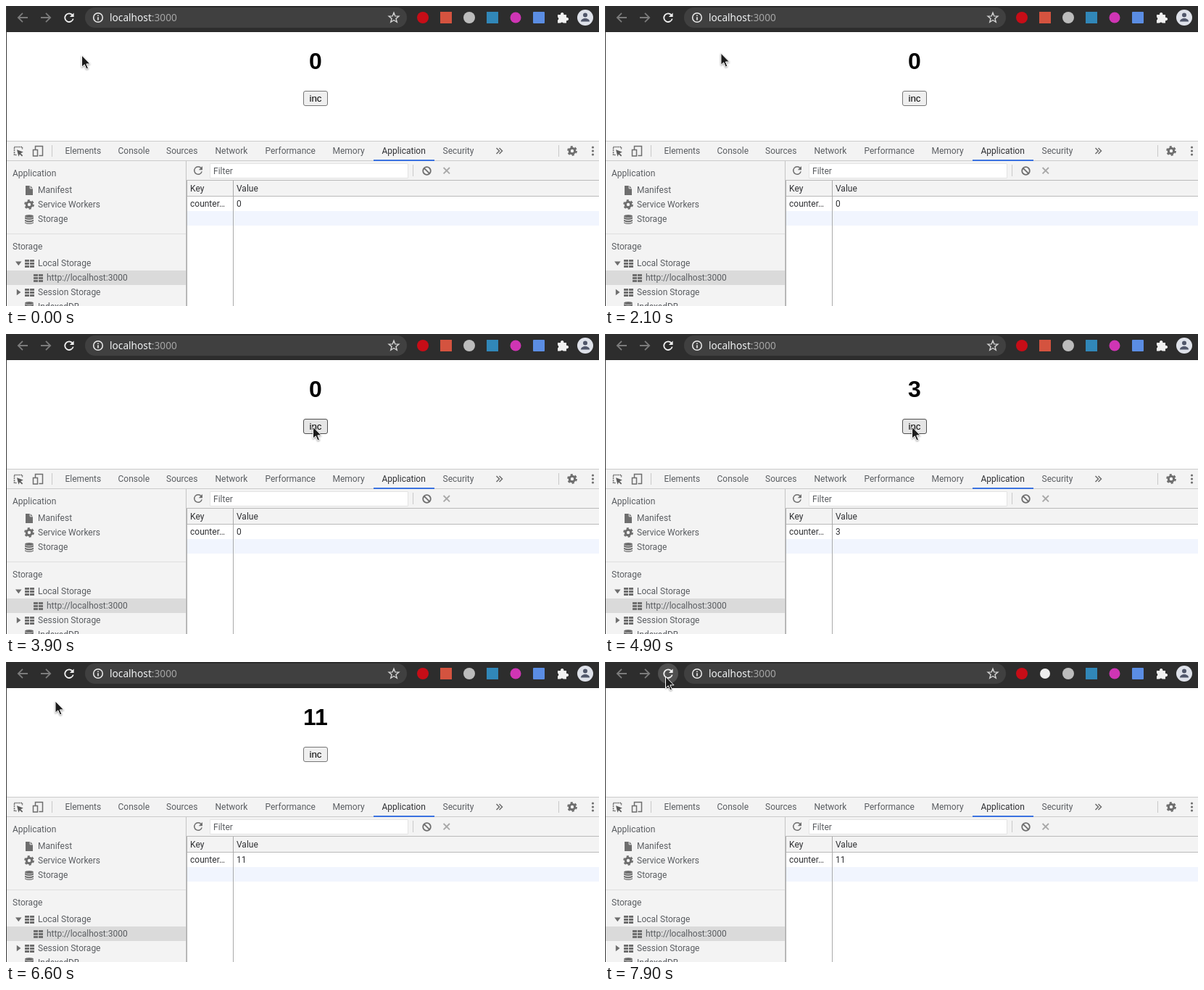
An HTML page that plays this animation: 818x414 px, repeating every 8000 ms.

```html
<!DOCTYPE html>
<html lang="en">
<head>
<meta charset="utf-8">
<title>Counter kept in local storage</title>
<style>
  html, body { margin: 0; width: 100%; height: 100%; overflow: hidden; background: #fff; }
  svg { display: block; width: 818px; height: 414px; }
  text { font: 12px Roboto, sans-serif; fill: #5a5d61; white-space: pre; }
  .dark { fill: #303134; }
  .url { font: 13.7px "Noto Sans", "Open Sans", sans-serif; fill: #f1f3f4; }
  .title { font: bold 32px "Liberation Sans", Arial, sans-serif; fill: #000; text-anchor: middle; }
  .label { font: 13.333px "Liberation Sans", Arial, sans-serif; fill: #000; text-anchor: middle; }
  .line { fill: none; stroke: #6e6e6e; stroke-width: 1.5; }
</style>
</head>
<body>
<svg viewBox="0 0 818 414">
  <defs>
    <path id="reload" d="M4.6-3.6A5.8 5.8 0 1 0 5.7 1.6M5.8-6.6V-1.3H.5Z"/>
    <g id="grid" fill="#6e6e6e">
      <path d="M0 0h6v3H0zM7 0h6v3H7zM0 4h6v3H0zM7 4h6v3H7zM0 8h6v3H0zM7 8h6v3H7z"/>
    </g>
    <g id="disk" fill="#6e6e6e">
      <ellipse cx="6" cy="2" rx="6" ry="2"/>
      <path d="M0 3.3q6 3 12 0v2.2q-6 3-12 0zM0 6.8q6 3 12 0V9q-6 3-12 0zM0 10.2q6 3 12 0v1.2q-6 3-12 0z"/>
    </g>
    <g id="gear">
      <circle r="3.7" fill="none" stroke="#6e6e6e" stroke-width="3"/>
      <circle r="5.8" fill="none" stroke="#6e6e6e" stroke-width="2.2" stroke-dasharray="3.04 3.04"/>
    </g>
  </defs>

  <!-- browser bar -->
  <rect width="818" height="36" fill="#2d2d2d"/>
  <rect y="35" width="818" height="1" fill="#262626"/>
  <circle id="hover" cx="87" cy="16" r="14" fill="#505050"/>
  <g fill="none" stroke="#7b7b7b" stroke-width="1.8">
    <path d="M30 16H17M23 9.8L16.8 16 23 22.2"/>
    <path d="M48 16H61M55 9.8L61.2 16 55 22.2"/>
  </g>
  <g transform="translate(87 16)" fill="none" stroke="#f1f1f1" stroke-width="1.8">
    <path d="M4.5-3.6A5.8 5.8 0 1 0 5.7 1.6"/>
    <path d="M6.6-6.6V-.9H.9Z" fill="#f1f1f1" stroke="none"/>
  </g>
  <rect x="109" y="2" width="444" height="28" rx="14" fill="#404040"/>
  <circle cx="127" cy="16" r="6.3" fill="none" stroke="#eee" stroke-width="1.5"/>
  <path d="M126.2 12.4h1.6v1.6h-1.6zM126.2 15.2h1.6v4.4h-1.6z" fill="#eee"/>
  <text class="url" x="143" y="21">localhost<tspan fill="#a4a4a4">:3000</tspan></text>
  <path id="star" fill="none" stroke="#d5d5d5" stroke-width="1.4"/>
  <circle cx="575" cy="16" r="8" fill="#c70d17"/>
  <rect id="devIcon" x="599" y="8" width="16" height="16" fill="#d4533f"/>
  <circle id="idleIcon" cx="607" cy="16" r="7" fill="#eee"/>
  <circle cx="639" cy="16" r="8" fill="#bcbcbc"/>
  <rect x="663" y="8" width="16" height="16" fill="#3187b8"/>
  <circle cx="703" cy="16" r="7.5" fill="#cf35b4"/>
  <rect x="727" y="8" width="16" height="16" rx="1" fill="#5b8de3"/>
  <path d="M761 12h4.2a2.2 2.2 0 1 1 4 0h3.8v4a2.2 2.2 0 1 1 0 4v3.6h-4.2a2.2 2.2 0 0 0-3.8 0H761v-4a2.2 2.2 0 0 0 0-4z" fill="#f1f1f1"/>
  <circle cx="799" cy="16" r="11" fill="#dfe2ea"/>
  <circle cx="799" cy="12.6" r="3" fill="#50566a"/>
  <path d="M793 21.6c0-6 12-6 12 0z" fill="#50566a"/>

  <!-- page -->
  <g id="page">
    <text id="title" class="title" x="427" y="87"></text>
    <rect id="button" x="410.5" y="117.5" width="33" height="20" rx="2.5"/>
    <text class="label" x="427" y="132">inc</text>
  </g>

  <!-- tools panel -->
  <rect y="186" width="818" height="228" fill="#f3f3f3"/>
  <rect y="186" width="818" height="1" fill="#cbcbcb"/>
  <rect y="213" width="818" height="1" fill="#cbcbcb"/>
  <path d="M63 192h1v16h-1zM762 192h1v16h-1zM561 219h1v16h-1z" fill="#c9c9c9"/>
  <path class="line" d="M14.5 205.5H11.5V194.5H22.5V198" stroke-width="1.3" stroke-dasharray="2 .8"/>
  <path d="M15 198.2l8.8 3.4-3.6 1.6 3 3.1-1.2 1.2-3.1-3.1-1.5 3.3z" fill="#5c5c5c"/>
  <path class="line" d="M40.5 198V193.5H50.5V206.5H45.5"/>
  <rect class="line" x="37.5" y="198.5" width="6" height="8.5"/>
  <g id="tabs"></g>
  <rect x="507" y="212" width="84" height="2" fill="#3b72e0"/>
  <path class="line" d="M676.5 196l4 4-4 4M680.5 196l4 4-4 4" stroke-width="1.3"/>
  <use href="#gear" x="781" y="200"/>
  <g fill="#6e6e6e">
    <circle cx="809.5" cy="195" r="1.6"/><circle cx="809.5" cy="200" r="1.6"/><circle cx="809.5" cy="205" r="1.6"/>
  </g>

  <!-- sidebar -->
  <rect x="1" y="314" width="247" height="1" fill="#dedede"/>
  <rect x="1" y="365" width="247" height="20" fill="#dadada"/>
  <path d="M27 248h6.5l3.5 3.5V261H27z" fill="#6e6e6e"/>
  <path d="M33.2 248v3.8H37" fill="none" stroke="#f3f3f3"/>
  <use href="#gear" x="32" y="274"/>
  <use href="#disk" x="26" y="288"/>
  <path d="M13 352.5h8.5l-4.2 5.8zM14.8 390.8v8.4l5.6-4.2z" fill="#6e6e6e"/>
  <use href="#grid" x="26" y="350"/>
  <use href="#grid" x="38" y="370"/>
  <use href="#grid" x="26" y="390"/>
  <use href="#disk" x="26" y="408"/>
  <g id="tree"></g>

  <!-- stored values -->
  <g transform="translate(265 227)">
    <path class="line" d="M4.2-3.4A5.3 5.3 0 1 0 5.2 1.4"/>
    <path d="M6-6V-.8H.8Z" fill="#6e6e6e"/>
  </g>
  <rect x="281" y="217" width="274" height="21" fill="#fff"/>
  <path d="M281.5 237.5V217.5H554.5V237.5Z" fill="none" stroke="#e3e3e3"/>
  <text x="286" y="232">Filter</text>
  <circle class="line" cx="580.5" cy="227.5" r="5.3" style="stroke-width:1.8"/>
  <path class="line" d="M576.8 223.8l7.4 7.4" style="stroke-width:1.8"/>
  <path d="M603.6 223l8.4 8.4M612 223l-8.4 8.4" fill="none" stroke="#a8a8a8" stroke-width="1.8"/>
  <rect x="249" y="263" width="569" height="151" fill="#fff"/>
  <rect x="249" y="283" width="569" height="20" fill="#f1f5fe"/>
  <path d="M249 240h569v1H249zM249 262h569v1H249z" fill="#b9b9b9"/>
  <rect x="248" y="214" width="1" height="200" fill="#c4c4c4"/>
  <path d="M249 241h1v173h-1zM313 241h1v173h-1z" fill="#aaa"/>
  <text class="dark" x="254" y="256">Key</text>
  <text class="dark" x="318" y="256">Value</text>
  <text class="dark" x="254" y="277">counter…</text>
  <text class="dark" id="value" x="318" y="277"></text>
  <rect width="1" height="414" fill="#3a3a3a"/>

  <path id="cursor" d="M0 0V16.2L3.8 12.8 6.4 19 9 17.9 6.4 11.9H11.6Z" fill="#1c1c1c" stroke="#fff" stroke-width="1" style="filter:drop-shadow(.5px 1px 1px rgba(0,0,0,.4))"/>
</svg>
<script>
const LOOP = 8000, STEP = 100;
const $ = id => document.getElementById(id);

function addText(group, x, y, label, dark) {
  const el = document.createElementNS('http://www.w3.org/2000/svg', 'text');
  el.setAttribute('x', x);
  el.setAttribute('y', y);
  el.textContent = label;
  if (dark) el.setAttribute('class', 'dark');
  $(group).append(el);
}

[['Elements', 81.5], ['Console', 154.5], ['Sources', 221], ['Network', 288.5], ['Performance', 357.5],
 ['Memory', 450.5], ['Application', 518.5], ['Security', 602.5]]
  .forEach(([label, x]) => addText('tabs', x, 204, label, label === 'Application'));

[['Application', 9, 235], ['Manifest', 44, 258], ['Service Workers', 44, 278], ['Storage', 44, 298],
 ['Storage', 9, 336], ['Local Storage', 44, 359], ['http://localhost:3000', 56, 379],
 ['Session Storage', 44, 399], ['IndexedDB', 44, 419]]
  .forEach(([label, x, y]) => addText('tree', x, y, label));

const star = Array.from({ length: 10 }, (_, i) => {
  const r = i % 2 ? 3.1 : 7.2, a = i * Math.PI / 5;
  return `${535 + r * Math.sin(a)} ${16.4 - r * Math.cos(a)}`;
});
$('star').setAttribute('d', `M${star.join('L')}Z`);

// Pointer stops: time, x, y
const path = [
  [0, 104.5, 68], [500, 89, 17], [1600, 89, 17], [2400, 202.5, 94], [2600, 202.5, 94],
  [2900, 246, 101], [3500, 419, 126], [3600, 423, 127], [3800, 423, 127], [3900, 423.5, 128],
  [5900, 423.5, 128], [6300, 145, 74], [6600, 68, 54], [6900, 83.5, 20], [LOOP, 83.5, 20]
];

// Time, count, button look
const clicks = [
  [0, 0, 'plain'], [3500, 0, 'over'], [4300, 0, 'down'], [4400, 1, 'over'], [4600, 1, 'down'],
  [4700, 2, 'over'], [4800, 2, 'down'], [4900, 3, 'over'], [5000, 3, 'down'], [5100, 4, 'over'],
  [5200, 5, 'down'], [5300, 6, 'over'], [5400, 6, 'down'], [5500, 7, 'over'], [5600, 8, 'down'],
  [5700, 9, 'over'], [5800, 10, 'down'], [5900, 11, 'over'], [6000, 11, 'plain']
];
const looks = {
  plain: ['#efefef', '#767676'],
  over: ['#e5e5e5', '#4f4f4f'],
  down: ['#f5f5f5', '#8d8d8d']
};

function pointerAt(t) {
  const i = path.findIndex(p => p[0] > t);
  const [t0, x0, y0] = path[i - 1], [t1, x1, y1] = path[i];
  const p = (t - t0) / (t1 - t0);
  return [x0 + (x1 - x0) * p, y0 + (y1 - y0) * p];
}

const within = (t, from, to) => t >= from && t < to;
const show = (id, on) => $(id).setAttribute('visibility', on ? 'visible' : 'hidden');

function draw(t) {
  const [, count, look] = clicks.findLast(c => c[0] <= t);
  const loading = within(t, 1300, 1500) || t >= 7900;
  $('title').textContent = $('value').textContent = count;
  $('button').setAttribute('fill', looks[look][0]);
  $('button').setAttribute('stroke', looks[look][1]);
  show('page', !loading);
  show('devIcon', !loading);
  show('idleIcon', loading);
  show('hover', within(t, 1100, 1700) || t >= 7700);
  $('cursor').setAttribute('transform', `translate(${pointerAt(t)})`);
}

const start = performance.now();
function tick() {
  const t = (performance.now() - start) % LOOP;
  draw(Math.floor(t / STEP) * STEP);
  requestAnimationFrame(tick);
}
tick();
</script>
</body>
</html>
```
